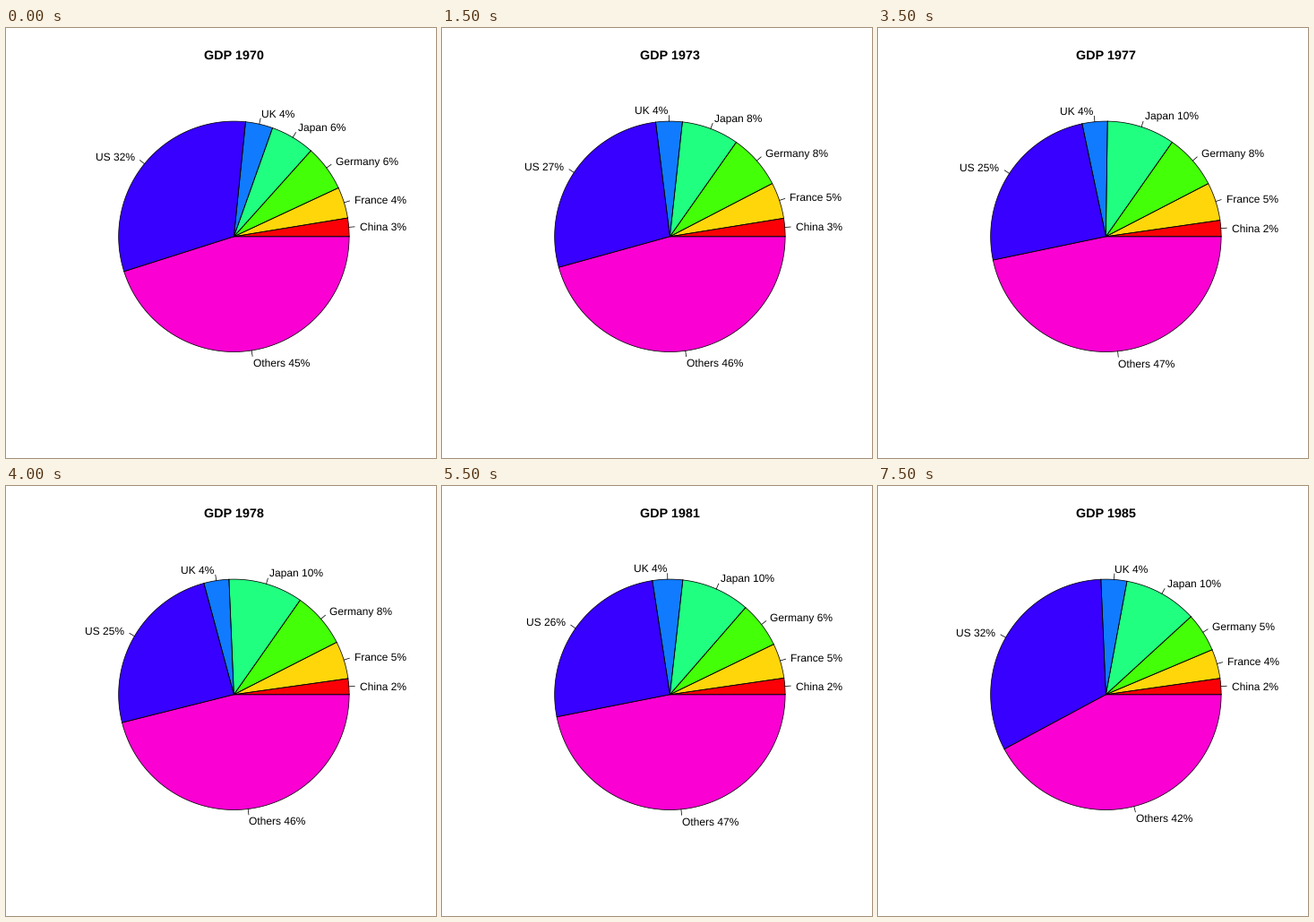
Animation of 480 by 480 pixels, one loop 8000 ms. Source, as a matplotlib script:

```python
import numpy as np
import matplotlib.pyplot as plt
from matplotlib.animation import FuncAnimation

plt.rcParams["font.family"] = "Liberation Sans"
plt.rcParams["text.hinting"] = "none"

SIZE = 480
CX, CY, R = 254.4, 232.8, 128.7
YEARS = range(1970, 1986)
LINE = dict(color="black", linewidth=0.75)

# Percent of world GDP at the turning years; straight lines join them.
TURNS = [1970, 1973, 1975, 1978, 1980, 1981, 1983, 1985]
TRENDS = {
    "China": ("#fb0007", [2.58, 2.54, 2.35, 2.22, 2.4, 2.29, 2.38, 2.25]),
    "France": ("#ffd60a", [4.36, 5.07, 5.46, 5.27, 5.7, 4.89, 4.4, 4.1]),
    "Germany": ("#43ff08", [6.42, 7.63, 7.43, 7.77, 7.7, 6.43, 6.05, 5.45]),
    "Japan": ("#21ff80", [6.2, 8.03, 7.72, 10.42, 8.9, 9.6, 9.55, 10.27]),
    "UK": ("#107bff", [3.82, 3.7, 3.58, 3.51, 4.6, 4.22, 3.8, 3.62]),
    "US": ("#3700ff", [31.52, 27.33, 25.45, 24.72, 23.3, 25.67, 28.52, 32.15]),
}
REST = ("Others", "#fb00d3")

fig = plt.figure(figsize=(SIZE / 72, SIZE / 72), dpi=72, facecolor="white")
ax = fig.add_axes([0, 0, 1, 1])


def slices(year):
    parts = [(name, color, np.interp(year, TURNS, values))
             for name, (color, values) in TRENDS.items()]
    return parts + [(*REST, 100 - sum(share for *_, share in parts))]


def polar(angle, radius):
    return CX + radius * np.cos(angle), CY - radius * np.sin(angle)


def draw_slice(a, b, color):
    x, y = polar(np.linspace(a, b, 120), R)
    x, y = np.append(x, CX), np.append(y, CY)
    ax.fill(x, y, color=color, linewidth=0)
    ax.plot(np.append(x, x[0]), np.append(y, y[0]), **LINE)


def draw_label(angle, name, share):
    ax.plot(*polar(angle, np.array([R, 1.05 * R])), **LINE)
    x, y = polar(angle, 1.1 * R)
    # Centre on the ink, so names with descenders sit a little higher.
    drop = 3.7 if set(name) & set("py") else 4.8
    ax.text(x - 0.5, y + drop, f"{name} {share:.0f}%", fontsize=12,
            ha="right" if x < CX else "left", va="baseline")


def draw(i):
    ax.clear()
    ax.set(xlim=(0, SIZE), ylim=(SIZE, 0))
    ax.axis("off")
    ax.text(CX, 35, f"GDP {YEARS[i]}", fontsize=14.4, weight="bold",
            ha="center", va="baseline")
    start = 0
    for name, color, share in slices(YEARS[i]):
        end = start + 2 * np.pi * share / 100
        draw_slice(start, end, color)
        draw_label((start + end) / 2, name, share)
        start = end
    return []


anim = FuncAnimation(fig, draw, frames=len(YEARS), interval=500,
                     repeat=True, repeat_delay=0, blit=False)
plt.show()
```
